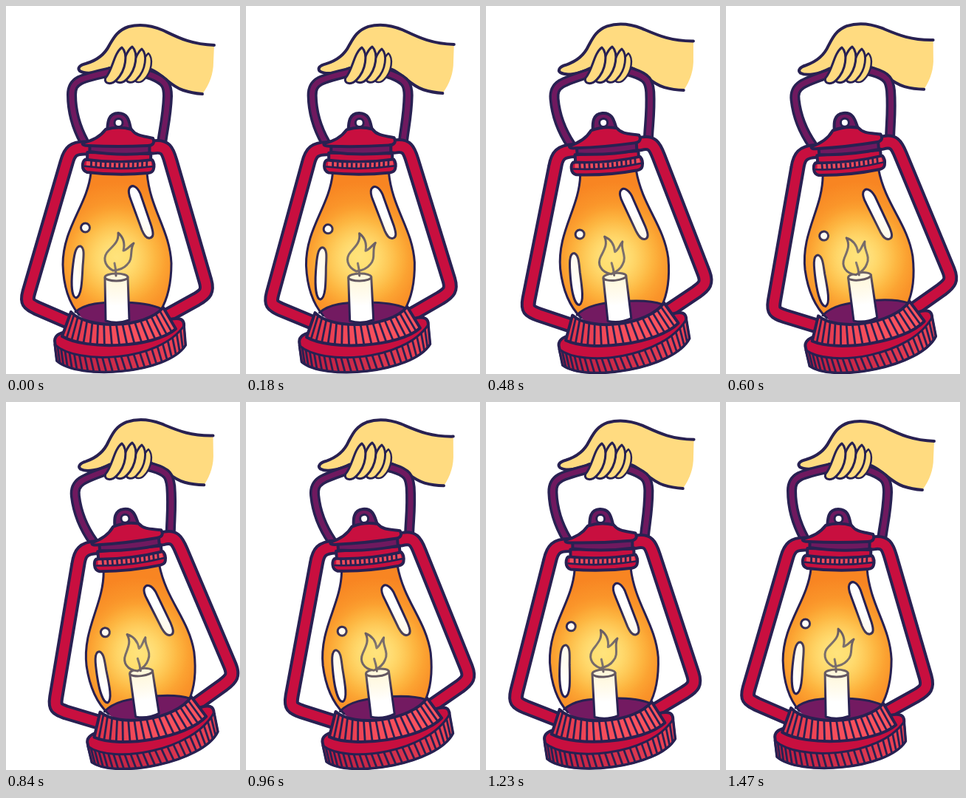
An HTML page for the animation above (1.5 s loop, 317 by 498 pixels).

```html
<!DOCTYPE html>
<html lang="en">
<head>
<meta charset="utf-8">
<title>Swinging lantern</title>
<style>
html, body { margin: 0; width: 100%; height: 100%; overflow: hidden; background: #fff; }
svg { display: block; width: 100%; height: 100%; }
.ink { stroke: #282152; stroke-width: 4; stroke-linejoin: round; stroke-linecap: round; }
.thin { stroke: #282152; stroke-width: 3; stroke-linejoin: round; stroke-linecap: round; }
.red { fill: #c80f3f; }
.plum { fill: #6f195f; }
.skin { fill: #ffdb80; }
.none { fill: none; }
.white { fill: #fff; }
</style>
</head>
<body>
<svg viewBox="0 0 317 498" xmlns="http://www.w3.org/2000/svg">
  <defs>
    <radialGradient id="glow" gradientUnits="userSpaceOnUse" cx="150" cy="342" r="104">
      <stop offset="0" stop-color="#ffe583"/>
      <stop offset=".25" stop-color="#ffd05a"/>
      <stop offset=".5" stop-color="#fdb13a"/>
      <stop offset=".75" stop-color="#fa952a"/>
      <stop offset="1" stop-color="#f88522"/>
    </radialGradient>
    <radialGradient id="halo" gradientUnits="userSpaceOnUse" cx="150" cy="340" r="66">
      <stop offset="0" stop-color="#fff0a0" stop-opacity=".48"/>
      <stop offset=".45" stop-color="#ffe88c" stop-opacity=".3"/>
      <stop offset="1" stop-color="#ffdc70" stop-opacity="0"/>
    </radialGradient>
    <linearGradient id="rib">
      <stop offset="0" stop-color="#dd3149"/>
      <stop offset=".4" stop-color="#f54c5a"/>
      <stop offset="1" stop-color="#fd5560"/>
    </linearGradient>
    <linearGradient id="foot">
      <stop offset="0" stop-color="#bd1c42"/>
      <stop offset=".55" stop-color="#d32f4b"/>
      <stop offset="1" stop-color="#f04757"/>
    </linearGradient>
  </defs>

  <g id="palm">
    <path class="skin" d="M282 53C250 52 232 42 213 33C197 26 181 24 166 28C151 33 146 43 140 53C133 67 122 74 108 78C100 80 96 84 100 88C108 93 125 91 140 84L197 86C212 92 222 108 240 114Q252 118 266 119Q281 99 281 76Z"/>
    <path class="ink none" d="M282 53C250 52 232 42 213 33C197 26 181 24 166 28C151 33 146 43 140 53C133 67 122 74 108 78C100 80 96 84 100 88C108 93 125 91 140 84M197 86C212 92 222 108 240 114Q252 118 266 119"/>
  </g>

  <g id="lamp">
    <g id="handle"></g>
    <g id="arms"></g>

    <path fill="url(#glow)" d="M115 226C110 270 77 300 77 350C78 385 88 405 99 418C125 436 185 434 209 413C220 395 224 370 224 348C222 303 195 275 191 226Z"/>
    <path fill="#731a61" d="M94 414C108 402 130 401 152 401Q192 401 211 410Q190 434 152 434Q112 434 94 414Z"/>
    <path class="thin none" d="M94 414C108 402 130 401 152 401Q192 401 211 410"/>
    <path class="thin none" d="M115 226C110 270 77 300 77 350C78 385 88 405 99 418M209 413C220 395 224 370 224 348C222 303 195 275 191 226"/>

    <path class="thin white" d="M134 368L135 426Q151 431 167 425L165 367Z"/>
    <ellipse class="thin white" cx="149.500" cy="367" rx="15.500" ry="5"/>
    <g id="flame">
      <path class="thin" fill="#ffd75c" d="M145 358C132 351 131 339 139 331C147 323 153 318 152 307C160 314 161 323 159 331C164 330 167 325 173 321C167 330 173 342 164 350Q158 357 145 358Z"/>
    </g>
    <path class="thin none" d="M149 365Q149 356 147 348"/>

    <g id="shine">
      <path class="thin white" d="M167 247C171 240 178 245 182 254L197 298C200 308 200 313 195 314C190 315 187 310 184 303L169 262Q165 252 167 247Z"/>
      <path id="sliver" class="thin white" d="M101 325C107 328 105 339 104 352C103 374 102 393 95 395C89 394 88 377 90 357C92 338 94 324 101 325Z"/>
      <circle class="thin white" cx="107.500" cy="300" r="6"/>
    </g>
    <circle cx="150" cy="340" r="66" fill="url(#halo)"/>

    <path class="ink red" d="M66 453C66 444 78 441 86 440L222 424C236 421 242 424 241 434L243 459C218 498 98 506 69 480Z"/>
    <path class="thin" fill="url(#foot)" d="M66 458C96 486 206 482 241 433L243 459C218 498 98 506 69 480Z"/>
    <g id="footRibs"></g>
    <path class="ink" fill="url(#rib)" d="M88 414C110 438 188 437 213 408L230 437C200 463 108 466 76 447Z"/>
    <g id="topRibs"></g>

    <g transform="rotate(1.500 152 210)">
      <path class="ink red" d="M110 199H196V214H110Z"/>
      <path class="ink plum" d="M113 186H194V198Q153 203 113 198Z"/>
      <path class="ink red" d="M107 209Q153 214 198 207Q202 212 200 220Q199 224 193 225Q152 230 110 226Q104 224 104 217Q104 211 107 209Z"/>
      <g id="collarRibs"></g>
    </g>

    <path class="ink plum" d="M137 170C138 163 136 145 152 145C168 145 167 161 170 169Z"/>
    <circle class="thin white" cx="152.500" cy="158" r="5.500"/>
    <path class="ink red" d="M104 185C120 182 129 175 135 167Q153 162 170 167C176 176 187 176 199 179C202 185 199 189 192 189Q152 191 112 189Q102 189 104 185Z"/>
  </g>

  <g id="fingers"></g>
</svg>
<script>
const NS = "http://www.w3.org/2000/svg";
const INK = "#282152";
const LOOP = 1500, STEP = 30;
const el = id => document.getElementById(id);

function add(id, attrs) {
  const p = document.createElementNS(NS, "path");
  for (const k in attrs) p.setAttribute(k, attrs[k]);
  el(id).appendChild(p);
}

function line(id, d, color, width, cap = "round") {
  add(id, { d, stroke: color, "stroke-width": width, fill: "none", "stroke-linecap": cap, "stroke-linejoin": "round" });
}

// A coloured bar with an ink edge on both sides
function bar(id, d, color, width, edge) {
  line(id, d, INK, width + 2 * edge);
  line(id, d, color, width);
}

function bezier(c, t) {
  const u = 1 - t, w = [u * u * u, 3 * u * u * t, 3 * u * t * t, t * t * t];
  return [0, 1].map(k => w.reduce((sum, v, i) => sum + v * c[i * 2 + k], 0));
}

function ribs(id, top, low, count, width) {
  for (let i = 1; i < count; i++) {
    const t = i / count;
    line(id, `M${bezier(top, t)}L${bezier(low, t)}`, INK, width, "butt");
  }
}

// A tapered finger curling from its knuckle (x, y) down to the tip
function finger(x, y, size) {
  add("fingers", {
    class: "thin skin",
    d: "M0 0C8 8 6 30 -7 43C-13 50 -24 49 -22 41C-12 30 -11 8 0 0Z",
    transform: `translate(${x} ${y}) scale(${size})`
  });
}

bar("handle", "M106 184C94 162 89 140 89 120C89 101 100 98 142 89Q180 86 198 94C217 102 219 108 219 122C218 150 213 168 211 186", "#6f195f", 7, 3.5);
bar("arms", "M110 192C91 191 86 197 82 212L31 387C27 401 30 403 42 409L86 428", "#c80f3f", 13, 4);
bar("arms", "M199 191C216 188 219 196 223 210L270 372C274 386 270 390 258 397L220 418", "#c80f3f", 13, 4);

ribs("footRibs", [66, 458, 96, 486, 206, 482, 241, 433], [69, 480, 98, 504, 218, 498, 243, 459], 25, 2.8);
ribs("topRibs", [88, 414, 110, 438, 188, 437, 213, 408], [76, 447, 108, 466, 200, 463, 230, 437], 18, 2.8);

line("collarRibs", "M109 214Q153 218 197 212", "#f04d5c", 6, "butt");
ribs("collarRibs", [109, 210, 140, 214, 168, 213, 197, 208], [109, 218, 140, 222, 168, 221, 197, 216], 14, 2.8);
line("collarRibs", "M107 218Q153 223 198 216", INK, 2.5);

finger(193, 64, .82);
finger(184, 58, .95);
finger(171, 55, 1.02);
finger(157, 56, 1.02);

function draw(now) {
  const t = Math.floor((now % LOOP) / STEP) * STEP;
  const swing = (1 - Math.cos(2 * Math.PI * t / LOOP)) / 2;
  const move = (id, value) => el(id).setAttribute("transform", value);
  move("lamp", `rotate(${-7 * swing} 155 82)`);
  move("flame", `translate(0 ${6 * swing}) rotate(${-18 * swing} 148 358)`);
  move("shine", `translate(0 ${8 * swing})`);
  move("sliver", `rotate(${-8 * swing} 97 360)`);
  move("palm", `rotate(${-3.4 * swing} 150 75)`);
}

const start = performance.now();
function tick() {
  draw(performance.now() - start);
  requestAnimationFrame(tick);
}
tick();
</script>
</body>
</html>
```
